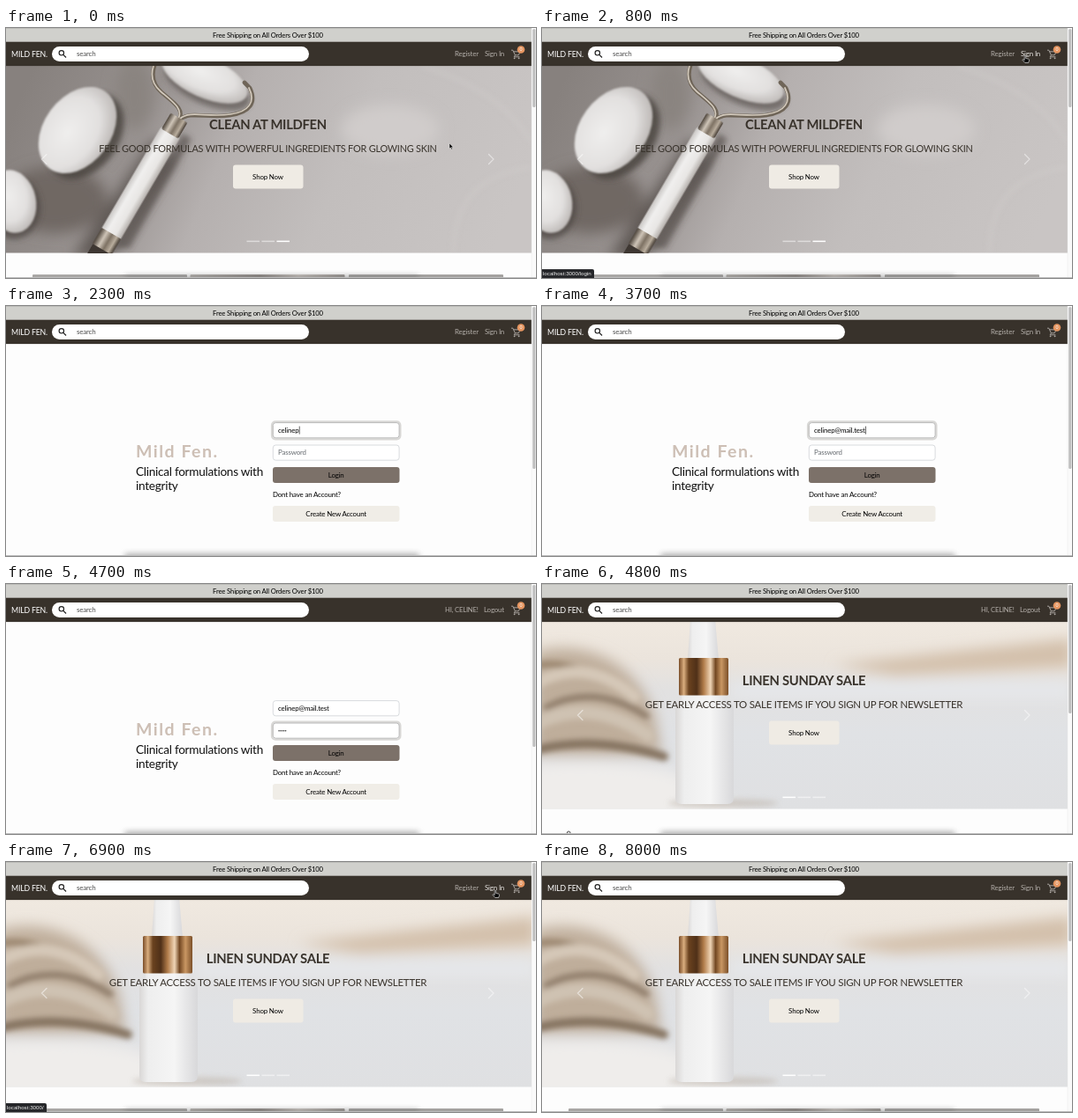
Write an HTML page that moves like this. It is 600 by 284 pixels and loops after 8100 ms.

```html
<!DOCTYPE html>
<html lang="en">
<head>
<meta charset="utf-8">
<title>Shop login demo</title>
<style>
html, body { margin: 0; width: 100%; height: 100%; overflow: hidden; background: #fdfdfd; }
svg { display: block; width: 100vw; height: 100vh; }
text { font-family: Lato, "Open Sans", sans-serif; font-size: 7.9px; letter-spacing: -.02em; white-space: pre; }
.mid { text-anchor: middle; }
.head { font-size: 14.8px; font-weight: 700; fill: #38322b; }
.sub { fill: #38322b; }
.link { fill: #b3aea9; }
.link.hot { fill: #e9e6e3; }
.hint { fill: #666b70; }
.field { fill: #fff; stroke: #cfd2d6; stroke-width: .8; }
.field.focus { stroke: #a9a9a9; }
.ring { fill: none; stroke: #d9d8d6; stroke-width: 2.2; }
.soft { filter: url(#b3); }
.haze { filter: url(#b8); }
</style>
</head>
<body>
<svg viewBox="0 0 600 284" preserveAspectRatio="none">
<defs>
  <filter id="b1" x="-20%" y="-20%" width="140%" height="140%"><feGaussianBlur stdDeviation="0.8"/></filter>
  <filter id="b3" x="-40%" y="-60%" width="180%" height="220%"><feGaussianBlur stdDeviation="3"/></filter>
  <filter id="b8" x="-60%" y="-60%" width="220%" height="220%"><feGaussianBlur stdDeviation="8"/></filter>
  <clipPath id="hero"><rect y="43" width="595" height="212.5"/></clipPath>
  <linearGradient id="stoneBg" x1="0" y1=".35" x2="1" y2=".5">
    <stop offset="0" stop-color="#87817e"/><stop offset=".25" stop-color="#989290"/>
    <stop offset=".42" stop-color="#b5b0af"/><stop offset=".65" stop-color="#c2bebd"/>
    <stop offset="1" stop-color="#c9c5c4"/>
  </linearGradient>
  <radialGradient id="pebble" cx=".42" cy=".4" r=".68">
    <stop offset="0" stop-color="#efeeed"/><stop offset=".6" stop-color="#e2e0df"/><stop offset="1" stop-color="#b5b0ad"/>
  </radialGradient>
  <linearGradient id="handle">
    <stop offset="0" stop-color="#c9c6c4"/><stop offset=".3" stop-color="#f0efee"/>
    <stop offset=".7" stop-color="#e8e6e4"/><stop offset="1" stop-color="#b5b0ac"/>
  </linearGradient>
  <linearGradient id="steel">
    <stop offset="0" stop-color="#4d443b"/><stop offset=".3" stop-color="#cfc5b8"/>
    <stop offset=".55" stop-color="#7d7163"/><stop offset=".8" stop-color="#b9ad9d"/><stop offset="1" stop-color="#453c34"/>
  </linearGradient>
  <linearGradient id="creamBg" x1="0" y1="0" x2="0" y2="1">
    <stop offset="0" stop-color="#f0e9e0"/><stop offset=".2" stop-color="#ebe4dc"/>
    <stop offset=".36" stop-color="#e2e1e1"/><stop offset=".6" stop-color="#e0e2e5"/><stop offset="1" stop-color="#dfe0e2"/>
  </linearGradient>
  <linearGradient id="gold">
    <stop offset="0" stop-color="#7a4d28"/><stop offset=".1" stop-color="#d9ad7e"/>
    <stop offset=".2" stop-color="#6a421f"/><stop offset=".36" stop-color="#4f3018"/>
    <stop offset=".5" stop-color="#b17c4a"/><stop offset=".64" stop-color="#efd5b6"/>
    <stop offset=".74" stop-color="#734822"/><stop offset=".86" stop-color="#c99763"/><stop offset="1" stop-color="#7c5029"/>
  </linearGradient>
  <linearGradient id="glass">
    <stop offset="0" stop-color="#d9d7d6"/><stop offset=".15" stop-color="#eeeeee"/>
    <stop offset=".6" stop-color="#f5f5f5"/><stop offset="1" stop-color="#d8d8da"/>
  </linearGradient>
  <linearGradient id="card">
    <stop offset="0" stop-color="#b5b1ad"/><stop offset=".45" stop-color="#8a8480"/>
    <stop offset=".7" stop-color="#cbc5c0"/><stop offset="1" stop-color="#96918d"/>
  </linearGradient>
</defs>

<rect width="600" height="284" fill="#fdfdfd"/>

<g id="home">
  <g clip-path="url(#hero)">
    <g id="slideA">
      <rect y="43" width="595" height="213" fill="url(#stoneBg)"/>
      <g class="haze">
        <ellipse cx="55" cy="195" rx="60" ry="38" fill="#6f6864"/>
        <path d="M168 125L75 262H115L190 150z" fill="#5d5652"/>
        <ellipse cx="145" cy="75" rx="22" ry="40" fill="#8a8480"/>
        <ellipse cx="435" cy="115" rx="55" ry="28" fill="#d0cccb"/>
      </g>
      <g fill="none" stroke="#d4d0cf" class="soft" opacity=".5">
        <path d="M595 158Q505 170 507 256M470 43Q560 70 595 130" stroke-width="3"/>
      </g>
      <g class="soft" fill="#4b4541">
        <ellipse cx="90" cy="123" rx="54" ry="37" transform="rotate(-54 90 123)" opacity=".85"/>
        <ellipse cx="9" cy="204" rx="30" ry="36" opacity=".7"/>
        <ellipse cx="228" cy="65" rx="52" ry="22" transform="rotate(24 228 65)" opacity=".6"/>
        <path d="M200 120L210 126L140 250H122z" opacity=".6"/>
      </g>
      <g filter="url(#b1)" fill="url(#pebble)">
        <ellipse cx="81" cy="116" rx="54" ry="38" transform="rotate(-54 81 116)"/>
        <ellipse cx="7" cy="197" rx="27" ry="36" transform="rotate(-12 7 197)"/>
        <ellipse cx="225" cy="56" rx="52" ry="23" transform="rotate(24 225 56)"/>
      </g>
      <g fill="none" stroke-linecap="round">
        <path d="M196 104C202 92 190 85 176 73C167 65 164 56 168 43M197 104C208 94 228 103 254 99C276 96 284 85 276 68L270 62" stroke="#6f6558" stroke-width="4.6"/>
        <path d="M195 103C201 92 189 84 175 72C166 64 163 55 167 43M197 103C208 93 228 102 254 98C275 95 283 84 275 68" stroke="#d3cabd" stroke-width="1.7"/>
      </g>
      <g transform="translate(196 102) rotate(30.3)">
        <rect x="-12.5" y="18" width="25" height="137" rx="4" fill="url(#handle)"/>
        <rect x="-11" width="22" height="21" rx="2" fill="url(#steel)"/>
        <rect x="-12.5" y="152" width="25" height="21" rx="1" fill="url(#steel)"/>
        <rect x="-12" y="173" width="24" height="20" fill="#3e3732"/>
      </g>
      <text class="mid head" x="296.5" y="115.4">CLEAN AT MILDFEN</text>
      <text class="mid sub" x="296.5" y="141" style="font-size:10.9px">FEEL GOOD FORMULAS WITH POWERFUL INGREDIENTS FOR GLOWING SKIN</text>
    </g>
    <g id="slideB">
      <rect y="43" width="595" height="213" fill="url(#creamBg)"/>
      <g class="haze">
        <path d="M330 92L600 62V94L400 104z" fill="#d3c0ab"/>
        <path d="M215 112H600V130H215z" fill="#e6e8eb"/>
        <path d="M-10 78C45 62 105 85 128 150L135 195H-10z" fill="#bfae9b"/>
        <path d="M-20 205Q80 196 150 214L250 270H-20z" fill="#efedeb"/>
      </g>
      <g class="soft" fill="none" stroke-linecap="round">
        <path d="M-5 92Q30 88 50 104" stroke="#9d8871" stroke-width="8"/>
        <path d="M-5 112Q50 82 105 128" stroke="#d5c8b8" stroke-width="13"/>
        <path d="M5 140Q60 112 118 150" stroke="#8f7d6a" stroke-width="7"/>
        <path d="M-5 158Q55 128 120 172" stroke="#cfc2b2" stroke-width="15"/>
        <path d="M-5 188Q60 172 138 196" stroke="#857361" stroke-width="10"/>
      </g>
      <ellipse class="soft" cx="205" cy="249" rx="62" ry="5" fill="#c4bdb6" opacity=".7"/>
      <path d="M168 40h28l4 46h-35z" fill="url(#glass)"/>
      <path d="M158 126h50v5q9 4 9 13v99q0 7-7 7h-52q-7 0-7-7v-99q0-9 7-13z" fill="url(#glass)"/>
      <rect x="155" y="84" width="56" height="42.5" rx="1.5" fill="url(#gold)"/>
      <text class="mid head" x="296.5" y="115.4">LINEN SUNDAY SALE</text>
      <text class="mid sub" x="296.5" y="141" style="font-size:11.45px">GET EARLY ACCESS TO SALE ITEMS IF YOU SIGN UP FOR NEWSLETTER</text>
    </g>
    <rect x="257" y="155.5" width="79.5" height="27" rx="3" fill="#efebe4"/>
    <text class="mid" x="296.5" y="171.6">Shop Now</text>
    <path d="M46 143.5L40.5 149L46 154.5M546.5 143.5L552 149L546.5 154.5" fill="none"
      stroke="#fff" stroke-width="1.2" opacity=".5" stroke-linecap="round"/>
    <g fill="#fff">
      <rect class="dot" x="272.5" y="241.6" width="14.5" height="1.5"/>
      <rect class="dot" x="289.5" y="241.6" width="14.5" height="1.5"/>
      <rect class="dot" x="306.5" y="241.6" width="14.5" height="1.5"/>
    </g>
  </g>
  <g id="cards">
    <rect x="30" y="280" width="175" height="4" rx="1" fill="#a9a7a5"/>
    <rect x="208.5" y="280" width="175" height="4" rx="1" fill="url(#card)"/>
    <rect x="388" y="280" width="175" height="4" rx="1" fill="#a4a2a0"/>
  </g>
  <path id="stub" d="M28.3 284v-1q0-2 1.9-2t1.9 2v1" fill="none" stroke="#333" stroke-width=".9"/>
</g>

<g id="login">
  <text x="147" y="172" fill="#cdbfb5" style="font-size:19.5px;font-weight:700;letter-spacing:1.5px">Mild Fen.</text>
  <g fill="#111">
    <text x="147" y="193" style="font-size:13.6px">Clinical formulations with</text>
    <text x="147" y="208.7" style="font-size:13.6px">integrity</text>
  </g>
  <rect id="ring1" class="ring" x="301" y="131.3" width="145.4" height="20" rx="4"/>
  <rect id="ring2" class="ring" x="301" y="156.7" width="145.4" height="20" rx="4"/>
  <rect id="box1" class="field" x="302.3" y="132.6" width="142.8" height="17.2" rx="3"/>
  <rect id="box2" class="field" x="302.3" y="158" width="142.8" height="17.2" rx="3"/>
  <text id="mailHint" class="hint" x="308" y="144">Email</text>
  <text id="mail" x="308" y="144"></text>
  <rect id="caret" y="136.6" width=".7" height="9" fill="#222"/>
  <text id="passHint" class="hint" x="308" y="169.4">Password</text>
  <g id="pass" fill="#333"></g>
  <rect x="302" y="183" width="143.5" height="18" rx="3" fill="#7c7169"/>
  <text class="mid" x="373.7" y="194.6">Login</text>
  <text x="302" y="216.6">Dont have an Account?</text>
  <rect x="302" y="227" width="143.5" height="18" rx="3" fill="#f0ede7"/>
  <text class="mid" x="373.7" y="238.8">Create New Account</text>
</g>

<rect x="134" y="281" width="334" height="10" rx="4" fill="#777" opacity=".55" filter="url(#b3)"/>
<rect y="283" width="600" height="1" fill="#bcbcbc"/>

<rect width="595" height="16" fill="#d0d0cc"/>
<rect width="600" height=".7" fill="#b4b4b1"/>
<text class="mid" x="296.5" y="10.8" style="font-size:7.7px">Free Shipping on All Orders Over $100</text>
<rect y="15.7" width="595" height="27.4" fill="#38322b"/>
<text x="6" y="32.8" fill="#fff" style="font-size:8.7px">MILD FEN.</text>
<rect x="52" y="21" width="291" height="17" rx="8.5" fill="#fff"/>
<g fill="none" stroke="#222" stroke-width="1.2"><circle cx="62.8" cy="28.3" r="2.7"/><path d="M64.8 30.3L68 33.5"/></g>
<text x="80" y="32" fill="#4a4a4a">search</text>
<g id="guest">
  <text class="link" x="508" y="32">Register</text>
  <text id="signIn" class="link" x="542" y="32">Sign In</text>
</g>
<g id="user">
  <text id="hello" class="link" x="497" y="32" style="font-size:7.6px">HI, CELINE!</text>
  <text id="logout" class="link" x="541" y="32">Logout</text>
</g>
<path d="M572 25.2h1.8l2.6 5.6h3.8l2-4h-7.6M576.4 30.8l-1.2 2h6.2" stroke="#b3aea9" fill="none" stroke-width=".9"/>
<g fill="#b3aea9"><circle cx="575.6" cy="34.3" r=".9"/><circle cx="580.6" cy="34.3" r=".9"/></g>
<circle cx="583" cy="24.5" r="4.3" fill="#e69661"/>
<text class="mid" x="583" y="26.4" fill="#fff" style="font-size:5.2px">0</text>

<rect x="595" width="5" height="283" fill="#fafafa"/>
<rect x="594.8" width=".4" height="283" fill="#e4e4e4"/>
<rect id="thumb" x="596.2" y="1" width="3.3" height="89" rx="1.6" fill="#c0c0c0"/>

<g id="status">
  <path id="tip" fill="#26272a"/>
  <text id="url" x="1" y="281.3" fill="#f2f2f2" style="font:6.2px 'Liberation Sans',sans-serif;letter-spacing:0"></text>
</g>

<g id="cursor">
  <path id="arrow" d="M0 0V6l1.4-1.2 1 2.2 1-.4-1-2.2h1.900z" fill="#000" stroke="#fff" stroke-width=".4"/>
  <path id="hand" d="M-.8.7q.8-1.2 1.5 0v2.8l3 .7q1 .4.8 1.5l-.8 2.800h-3.900L-3 5.400q.3-1 1.200-.6l1 .8z" fill="#000" stroke="#fff" stroke-width=".6"/>
  <path id="beam" d="M-1.6-3.5q1.6 0 1.6 1v5q0 1-1.6 1M1.6-3.5q-1.6 0-1.6 1v5q0 1 1.6 1M-.8.9h1.6" fill="none" stroke-width=".8"/>
</g>
</svg>

<script>
const LOOP = 8100, STEP = 100;
const LOGIN_AT = 900, USER_AT = 4600, HOME_AT = 4800, LOGOUT_AT = 6900;
const $ = id => document.getElementById(id);
const show = (id, on) => { $(id).style.display = on ? '' : 'none'; };
const within = (t, a, b) => t >= a && t < b;
const dots = document.querySelectorAll('.dot');

// bursts of typing: [first key, last key, letters before, letters after]
const MAIL = 'celinep@mail.test';
const mailBursts = [[1800, 2300, 1, 7], [2700, 2700, 7, 8], [2900, 3200, 8, 12], [3400, 3700, 12, 17]];
const passBursts = [[4000, 4400, 0, 5]];

function typed(bursts, t) {
  let n = 0;
  for (const [a, b, from, to] of bursts) {
    if (t < a) break;
    const u = Math.min(1, (t - a + STEP) / (b - a + STEP));
    n = Math.ceil(from + (to - from) * u);
  }
  return n;
}

// [time, x, y] of the pointer
const path = [[0, 502, 131], [800, 547, 31], [900, 546, 30], [1500, 376, 140], [4800, 376, 140],
  [5900, 526, 33], [6100, 529, 33], [6200, 529, 33], [6700, 553, 31], [6900, 554, 32],
  [7100, 563, 79], [8000, 470, 292], [8100, 470, 292]];

function pointerAt(t) {
  const i = path.findIndex(p => p[0] > t);
  const [t0, x0, y0] = path[i - 1], [t1, x1, y1] = path[i];
  const u = (t - t0) / (t1 - t0), e = (u + u * u * (3 - 2 * u)) / 2;
  return [x0 + (x1 - x0) * e, y0 + (y1 - y0) * e];
}

function drawPointer(t, login) {
  const [x, y] = pointerAt(t);
  const inNav = within(y, 24, 38);
  const onLink = inNav && within(x, 540, 566);
  const onName = inNav && within(x, 496, 535);
  const inField = login && within(x, 302, 446) && within(y, 132, 150);
  const kind = onLink ? 'hand' : onName || inField ? 'beam' : 'arrow';
  for (const k of ['arrow', 'hand', 'beam']) show(k, k === kind);
  $('beam').setAttribute('stroke', onName ? '#e8e8e8' : '#222');
  $('cursor').setAttribute('transform', `translate(${x.toFixed(2)} ${y.toFixed(2)})`);
  const visible = !within(t, 1800, 4900);
  show('cursor', visible);
  $('signIn').classList.toggle('hot', onLink);
  $('logout').classList.toggle('hot', onLink);
  $('hello').classList.toggle('hot', visible && onName);
  return visible && onLink;
}

function drawStatus(on, page) {
  show('status', on);
  $('tip').setAttribute('d', `M0 274h${page ? 57 : 44}q2 0 2 2v8H0z`);
  $('url').textContent = 'localhost:3000/' + page;
}

function drawForm(t) {
  const n = typed(mailBursts, t), p = typed(passBursts, t);
  const mailOn = within(t, 1500, 3800), passOn = t >= 3800;
  $('mail').textContent = MAIL.slice(0, n);
  show('mailHint', !n);
  show('passHint', !p);
  show('ring1', mailOn);
  show('ring2', passOn);
  $('box1').classList.toggle('focus', mailOn);
  $('box2').classList.toggle('focus', passOn);
  show('caret', mailOn);
  $('caret').setAttribute('x', 308 + (n ? $('mail').getComputedTextLength() + .3 : 0));
  $('pass').innerHTML = Array.from({ length: p }, (_, i) =>
    `<circle cx="${309 + i * 1.9}" cy="166.7" r=".75"/>`).join('');
}

function draw(t) {
  const first = t < LOGIN_AT, login = within(t, LOGIN_AT, HOME_AT);
  const user = within(t, USER_AT, LOGOUT_AT), bare = within(t, HOME_AT, HOME_AT + STEP);
  show('home', !login);
  show('login', login);
  show('slideA', first);
  show('slideB', !first);
  dots.forEach((d, i) => d.setAttribute('opacity', i === (first ? 2 : 0) ? 1 : .5));
  show('cards', !bare);
  show('stub', bare);
  show('guest', !user);
  show('user', user);
  $('thumb').setAttribute('height', login ? 184 : bare ? 146 : 89);
  if (login) drawForm(t);
  drawStatus(drawPointer(t, login), login || first ? 'login' : '');
}

function tick() {
  const t = performance.now() % LOOP;
  draw(Math.floor(t / STEP) * STEP);
  requestAnimationFrame(tick);
}
tick();
</script>
</body>
</html>
```
